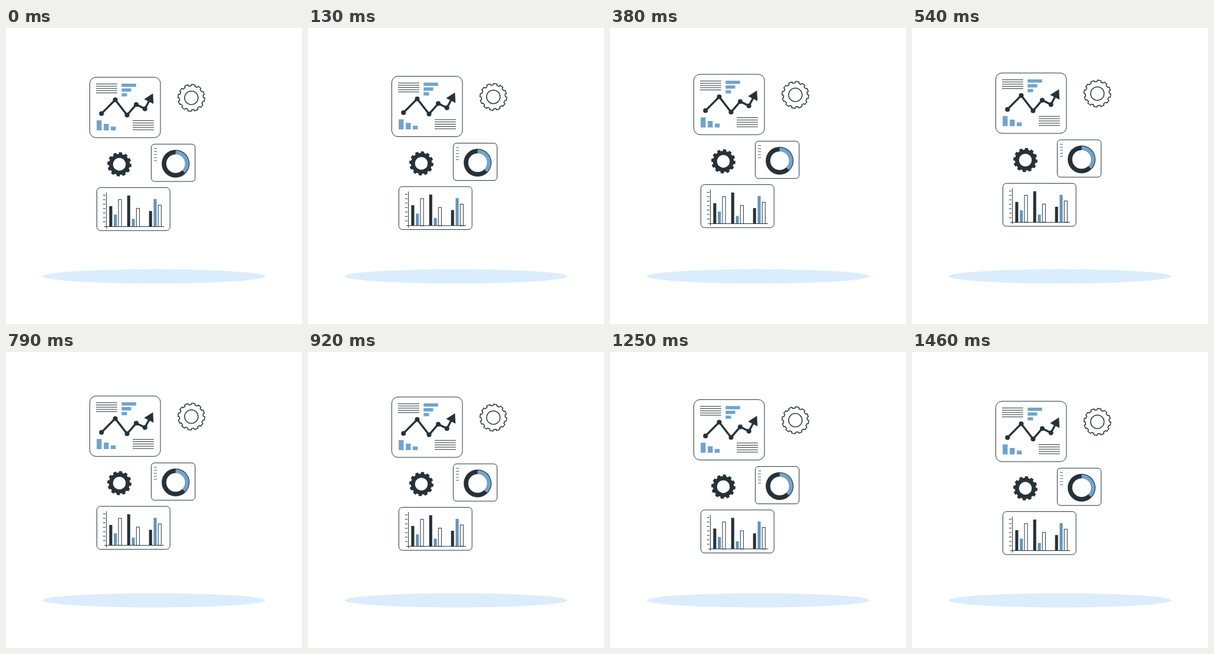
Animation of 500 by 500 pixels, one loop 1.5 s. Source, as an HTML page:

```html
<!DOCTYPE html>
<html lang="en">
<head>
<meta charset="utf-8">
<title>Floating dashboard</title>
<style>
  html, body { margin: 0; width: 100%; height: 100%; overflow: hidden; background: #fff; }
  svg { display: block; width: 100vw; height: 100vh; }
  .line { fill: none; stroke: #263238; }
  .panel { fill: #fff; stroke: #263238; }
  .dark { fill: #263238; }
  .blue { fill: #71a3cb; }
  .steel { fill: #6893b6; }
</style>
</head>
<body>
<svg viewBox="0 0 500 500">
  <ellipse cx="250" cy="419.5" rx="188" ry="12" fill="#dbedfc"/>
  <g id="float">
    <rect class="panel" x="141.5" y="83.2" width="119.4" height="102" rx="10.5"/>
    <path id="text" class="line"/>
    <path class="blue" d="M195.3 94h24.5v5.5h-24.5zM195.3 102h16.2v5.6h-16.2zM195.3 110.2h9.2v5.4h-9.2z
      M153.2 156h8.3v17h-8.3zM165.2 162h8.3v11h-8.3zM177 166.6h8.3v6.4h-8.3z"/>
    <path class="line" stroke-width="3.4" d="M161.3 144.6L184.5 121.3L204.5 147L220 129.2L234.7 136.5L243 121"/>
    <path class="dark" d="M248.3 110.6L249.2 128.2L233.3 120.2z"/>
    <g id="dots" class="dark"></g>

    <path id="gearOutline" class="line" stroke-width="1.5" stroke-linejoin="round"/>
    <circle class="line" cx="313.1" cy="118" r="11.4" stroke-width="1.5"/>
    <path id="gearSolid" class="dark"/>
    <circle cx="191.5" cy="230.3" r="10.7" fill="#fff"/>

    <rect class="panel" x="245.4" y="196.2" width="74" height="63" rx="5.5"/>
    <path id="ticks" class="line" stroke-width=".8"/>
    <circle class="dark" cx="286.5" cy="229.2" r="23.5"/>
    <path class="blue" d="M286.5 229.2V206.9A22.3 22.3 0 0 1 302.3 245z"/>
    <circle cx="286.5" cy="229.2" r="15.8" fill="#fff"/>

    <rect class="panel" x="153.5" y="269.6" width="123.6" height="72.6" rx="6"/>
    <g id="bars"></g>
    <path id="axes" class="line"/>
  </g>
</svg>
<script>
const LOOP = 1500, STEPS = 36, RISE = 10;
const byId = id => document.getElementById(id);
const setPath = (id, d) => byId(id).setAttribute('d', d);

const rows = (x, y, length, gap, count) =>
  Array.from({ length: count }, (_, i) => `M${x} ${y + i * gap}h${length}`).join('');

function gear(cx, cy, outer, root, tilt, teeth = 12) {
  const pitch = 360 / teeth, points = [];
  const add = (radius, degrees) => {
    const a = degrees * Math.PI / 180;
    points.push(`${cx + radius * Math.sin(a)} ${cy - radius * Math.cos(a)}`);
  };
  for (let i = 0; i < teeth; i++) {
    const mid = tilt + i * pitch;
    add(root, mid - pitch * .32);
    add(outer, mid - pitch * .24);
    add(outer, mid + pitch * .24);
    add(root, mid + pitch * .32);
  }
  return `M${points.join('L')}z`;
}

setPath('text', rows(152, 94.6, 35.8, 3.75, 5) + rows(214, 156.5, 35.8, 3.85, 5));
setPath('ticks', rows(250, 203.6, 5, 5.1, 5));
setPath('axes', 'M169.6 278V338.8M166 335.5H267' + rows(163.8, 282.5, 4.2, 7.5, 7));
setPath('gearOutline', gear(313.1, 118, 22.7, 20.2, 8));
setPath('gearSolid', gear(191.5, 230.3, 20.5, 17.7, 6));

byId('dots').innerHTML = [[161.3, 144.6], [184.5, 121.3], [204.5, 147], [220, 129.2], [234.7, 136.5]]
  .map(([x, y]) => `<circle cx="${x}" cy="${y}" r="4"/>`).join('');

const barStyles = ['dark', 'steel', 'panel'];
byId('bars').innerHTML = [[174.4, 301, 315.2, 289.8], [204.7, 283, 322.5, 304.7], [241.6, 309.2, 289, 299.3]]
  .map(([x, ...tops]) => tops.map((y, i) =>
    `<rect class="${barStyles[i]}" x="${x + i * 7.8}" y="${y}" width="5.1" height="${335.5 - y}"/>`).join('')).join('');

// Linear rise and fall, advanced in 24 steps per second
function draw(now) {
  const step = Math.floor((now % LOOP + 3.4) * STEPS / LOOP) % STEPS;
  const phase = (step + .5) / STEPS;
  const lift = RISE * (1 - Math.abs(1 - 2 * phase));
  byId('float').setAttribute('transform', `translate(0 ${.28 - lift})`);
  requestAnimationFrame(draw);
}
draw(0);
</script>
</body>
</html>
```
